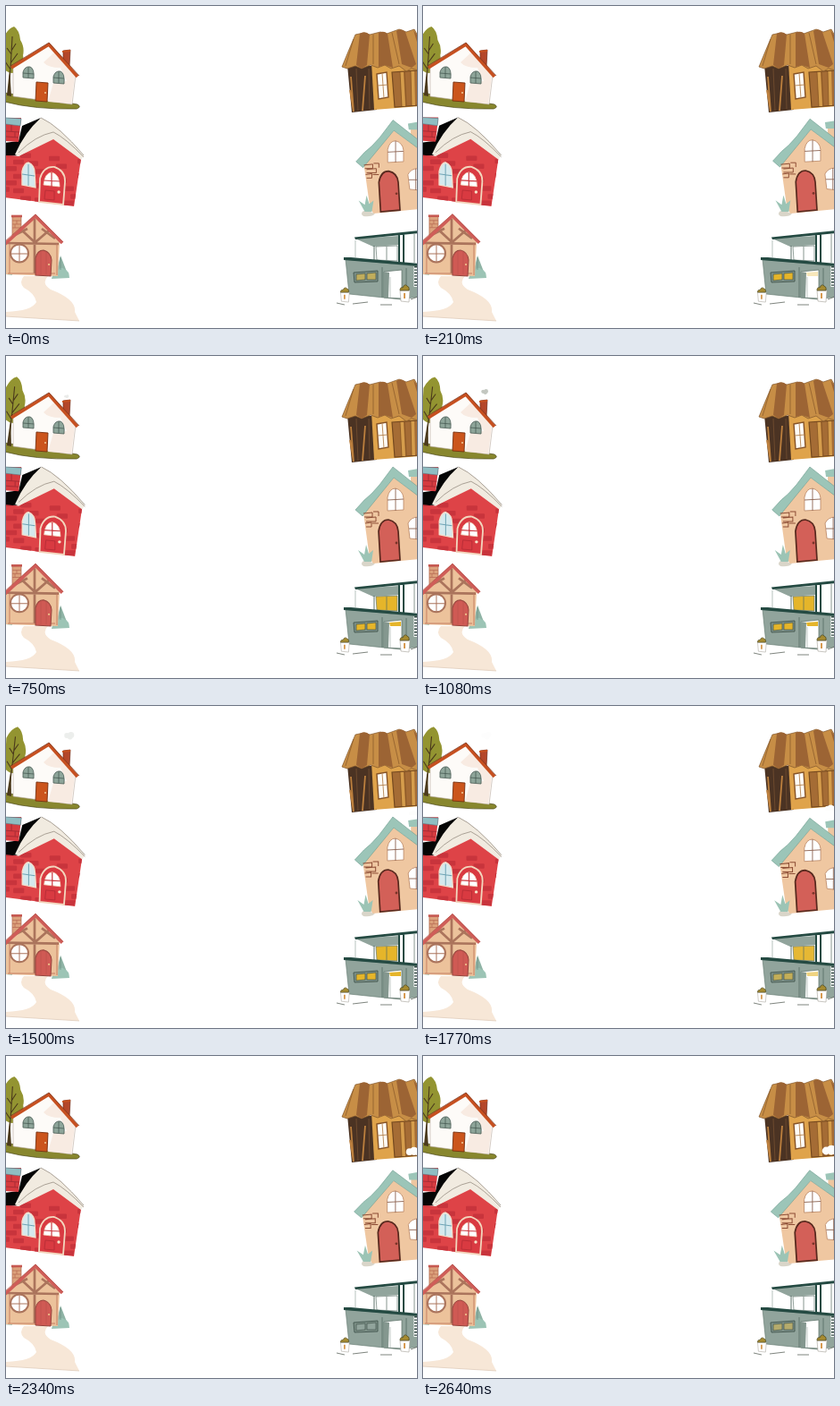
An HTML page for the animation above (2700 ms loop, 460x360 px).

```html
<!DOCTYPE html>
<html lang="en">
<head>
<meta charset="utf-8">
<title>Little houses</title>
<style>
html, body { margin: 0; width: 100%; height: 100%; overflow: hidden; background: #fff; }
svg { display: block; width: 460px; height: 360px; }
.line { fill: none; }
</style>
</head>
<body>
<svg viewBox="0 0 460 360">
  <!-- white cottage -->
  <path fill="#88872e" stroke="#4d4a1c" stroke-width=".7" d="M-2 97Q40 103 80 110Q85 113 79 115Q32 116 -2 107Z"/>
  <g id="tree">
    <path fill="#939431" d="M9 23Q15 27 16 38Q21 46 19 55Q21 65 12 73Q5 78-3 70V36Q2 25 9 23Z"/>
    <path class="line" stroke="#4b3a1c" stroke-width="1.1" d="M3 99Q5 72 7 34M5 64L13 53M5 71L-1 62M6 54L1 47M6 50L11 42"/>
    <path fill="#4b3a1c" d="M1 100L4 70L6 101Z"/>
  </g>
  <path fill="#b4472a" stroke="#6e2a18" stroke-width=".7" d="M64 50L72 49L71 68L64 63Z"/>
  <path class="line" stroke="#c65020" stroke-width="2" d="M63 51L72 50"/>
  <path fill="#fdfbf8" stroke="#b9aaa0" stroke-width=".6" d="M48 44L78 77L74 110L8 101V66Z"/>
  <path fill="#f8ebe2" d="M54 52L77 78L73 109L47 107L53 86L68 84L61 69Q47 69 42 63Z"/>
  <path class="line" stroke="#c65020" stroke-width="3.6" d="M6 69L48 43L80 79"/>
  <path class="line" stroke="#71301a" stroke-width=".7" d="M5 67L48 41L82 78"/>
  <path fill="#8ea59a" stroke="#485b54" stroke-width=".8" d="M19 80V74Q21 67 27 68Q32 70 31 81ZM53 86V79Q55 72 61 73Q66 75 65 87ZM25 68V80M19 75L31 76M59 73V86M53 80L65 81"/>
  <path fill="#cb551c" stroke="#773010" stroke-width=".9" d="M34 85L47 86L46 107L33 106Z"/>
  <circle cx="44" cy="97" r=".9" fill="#f5d9a8"/>
  <g id="smoke" fill="#c3c7c0"><circle r="2.6" cx="-2"/><circle r="3" cx="2" cy="-.4"/><circle r="2.4" cx="1" cy="1.6"/></g>

  <!-- snowy brick house -->
  <clipPath id="front"><path d="M53 147L84 170L76 224L-1 214V167L14 168Z"/></clipPath>
  <g id="red">
    <path fill="#050505" d="M39 125L18 134L14 151L-1 153V168L14 167Z"/>
    <path fill="#d63b40" d="M-1 125H17L14 152L-1 151Z"/>
    <path fill="#8fbdc2" stroke="#587f88" stroke-width=".6" d="M-1 125L17 126L16 134L-1 132Z"/>
    <path class="line" stroke="#a92d35" d="M-1 140L15 141M-1 146L14 147M6 133V140M10 141V147"/>
    <path fill="#de4347" d="M53 147L84 170L76 224L-1 214V167L14 168Z"/>
    <g id="bricks" fill="#c8343c" clip-path="url(#front)"></g>
    <path fill="#f1ebe0" d="M39 125Q58 133 87 167L84 172L53 149L14 168L10 166Q21 141 39 125Z"/>
    <path class="line" stroke="#8b8176" stroke-width=".7" d="M14 164Q33 145 53 141Q67 148 87 169M39 125Q59 134 87 167"/>
    <path fill="#d5e9ee" stroke="#f2dfcd" stroke-width="1.4" d="M18 200V185Q20 176 25 175Q32 178 32 187L33 203Z"/>
    <path class="line" stroke="#6fa4b5" stroke-width="1" d="M25 177V201M18 188L32 190"/>
    <path fill="#d93a41" stroke="#f3d6bd" stroke-width="1.8" d="M37 219L38 193Q42 179 54 180Q66 184 66 196L64 222Z"/>
    <path fill="#fff" stroke="#f3d6bd" stroke-width=".8" d="M42 200Q43 187 51 186Q60 188 60 202Z"/>
    <path class="line" stroke="#cb3a40" stroke-width="1.2" d="M51 186V202M42 195L60 196"/>
    <path class="line" stroke="#b72e36" stroke-width=".9" d="M44 206L54 207V217L43 216Z"/>
    <circle cx="59" cy="208" r="1.7" fill="#f6e3c9"/>
  </g>

  <!-- timber house with a path -->
  <path fill="#f7e7d7" d="M20 302H47Q39 310 50 317Q79 328 77 342L82 352L-1 347V342Q29 341 34 331Q32 321 20 315Q14 309 20 302Z"/>
  <path class="line" stroke="#dcc6b3" stroke-width=".7" d="M-1 347L82 352"/>
  <g id="timber">
    <path fill="#8fb3a5" d="M55 303L61 279L68 297L66 304Z"/>
    <path fill="#9cc4b5" d="M51 305Q53 295 58 296Q61 291 65 294Q71 296 71 304ZM-1 300V281Q5 287 7 301Z"/>
    <path class="line" stroke="#668f82" stroke-width=".7" d="M61 281V295"/>
    <path fill="#dca27c" stroke="#b16850" stroke-width=".7" d="M7 236L17 235V256L7 258Z"/>
    <path class="line" stroke="#b96d55" stroke-width=".8" d="M7 240H17M7 244H17M7 248H17M12 240V244M10 244V248"/>
    <path class="line" stroke="#c65952" stroke-width="2.6" d="M6 235H18"/>
    <path fill="#ecc29b" d="M33 236L60 264L58 302L-1 300V263Z"/>
    <path class="line" stroke="#ab745c" stroke-width="2.7" d="M-1 265L59 266M32 238V299M32 264L18 251M33 264L48 251M8 257L24 249M40 249L55 260"/>
    <path class="line" stroke="#c57e63" stroke-width="1" d="M4 266V299M57 266V301M2 299H55"/>
    <path class="line" stroke="#cf5d58" stroke-width="3.6" d="M-2 267L33 235L63 265"/>
    <path class="line" stroke="#a7433f" stroke-width=".6" d="M0 262L33 233L64 264"/>
    <circle cx="15" cy="276.5" r="10" fill="#fff" stroke="#ab745c" stroke-width="2"/>
    <path class="line" stroke="#ab745c" stroke-width="1" d="M15 267V287M5 277H25"/>
    <path fill="#cf5a54" stroke="#95443d" d="M33 301V282Q35 273 42 273Q50 275 51 284L50 302Z"/>
    <path class="line" stroke="#bd504a" stroke-width=".6" d="M39 274V300M45 274V300"/>
    <circle cx="48" cy="289" r="1" fill="#f0cd91"/>
  </g>

  <!-- thatched hut -->
  <path fill="#4b3323" d="M382 66L412 67L415 116L387 119Z"/>
  <path class="line" stroke="#6d4a2e" d="M392 70L394 117M406 70L407 115"/>
  <path class="line" stroke="#bd803e" stroke-width="1.8" d="M386 79L389 118M402 78L399 117M385 94L389 118"/>
  <path fill="#dfa34b" d="M409 62H462V112L412 116Z"/>
  <path fill="#fffdf7" stroke="#855226" stroke-width="1.4" d="M415 76L426 74L428 102L417 104Z"/>
  <path class="line" stroke="#b48350" stroke-width=".9" d="M421 75L423 103M416 89L427 88"/>
  <path fill="#a56c35" stroke="#75491f" stroke-width="1.2" d="M432 74L462 72V111L435 113Z"/>
  <path class="line" stroke="#d59d4c" stroke-width="4" d="M443 74L445 112M455 73L456 111"/>
  <path class="line" stroke="#80501f" stroke-width=".7" d="M441 74L443 112M446 73L448 111M453 73L454 111"/>
  <path fill="#c78e46" stroke="#80552b" stroke-width=".7" d="M391 32L400 30L407 32L419 29L426 31L440 26L448 29L457 26L462 35V72L454 70L448 73L440 67L431 70L424 66L416 69L408 66L398 70L391 67L382 70L376 68L383 51Z"/>
  <path fill="#9c6434" d="M396 31Q402 27 407 32L404 66L398 70L392 66ZM417 30Q423 27 427 31L433 69L424 66L417 68ZM437 28Q443 24 447 29L459 65L454 69L443 65ZM456 27L462 35V47Z"/>
  <path class="line" stroke="#865629" stroke-width=".7" d="M389 37L380 67M411 32L411 65M432 30L440 65"/>

  <!-- peach house -->
  <g id="steam" fill="#fdfdfc"><circle r="4.5" cx="-4" cy="1"/><circle r="5.5" cx="2"/><circle r="4.5" cx="7" cy="1"/></g>
  <path fill="#d9d5c9" d="M398 233Q398 228 405 229L413 232Q410 236 400 235Z"/>
  <g id="peach">
    <path fill="#eec6a0" d="M453 132H462V160H453Z"/>
    <path fill="#9cc5b8" d="M450 128L462 126V135H451Z"/>
    <path fill="#efc7a1" d="M434 136L462 157V227L411 232L407 226L400 176Z"/>
    <path fill="#9cc5b8" stroke="#6c9b8d" stroke-width=".6" d="M433 124L462 147V157L434 136L399 179L391 172L401 161L409 154L418 144Z"/>
    <path fill="#fff" stroke="#c08e6d" stroke-width=".9" d="M427 173V158Q429 148 436 148Q444 150 445 159V172Z"/>
    <path class="line" stroke="#8c6250" stroke-width=".9" d="M436 148V173M427 161L445 160"/>
    <path fill="#fff" stroke="#c08e6d" stroke-width=".9" d="M452 204L450 187Q453 180 462 180V205Z"/>
    <path class="line" stroke="#8c6250" stroke-width=".9" d="M451 193H462M459 180V205"/>
    <path class="line" stroke="#8d4d35" stroke-width="1" d="M400 176L410 175V180H401M411 174H417V179M403 181L414 180V185H403M402 187L409 186V191H403M410 187H417"/>
    <path fill="#d36058" stroke="#58291e" stroke-width="1.7" d="M419 230L417 196Q419 183 428 183Q438 185 439 196L441 228Z"/>
    <circle cx="437" cy="209" r="1.4" fill="#7b3429"/>
    <path fill="#9cc4b5" d="M401 230L394 217L401 222L403 211L406 221L411 217L409 230Z"/>
  </g>

  <!-- modern house -->
  <path class="line" stroke="#9aaaa3" stroke-width=".7" d="M391 262V281"/>
  <path fill="#91a49c" d="M391 260L411 269L440 267V257Z"/>
  <path class="line" stroke="#4c635a" stroke-width=".9" d="M412 268V284"/>
  <path id="upper" stroke="#657970" stroke-width=".7" d="M414 269L438 268V285L415 284Z"/>
  <path class="line" stroke="#536760" stroke-width=".7" d="M426 269V284M457 255V287"/>
  <path fill="#244a42" d="M390 258.5L462 251V254L391 261ZM439 256H441V287H439ZM444 255H446V287H444Z"/>
  <path fill="#91a49c" stroke="#5d756b" stroke-width=".6" d="M380 283L462 291V325L442 328L384 322Z"/>
  <path fill="#244a42" d="M378 281L386 281L462 288V291L378 284Z"/>
  <path class="line" stroke="#61766e" d="M421 292V326M448 293V314"/>
  <path fill="#7d9188" stroke="#42554e" stroke-width=".9" d="M389 298L416 296V308L390 309Z"/>
  <path id="lower" stroke="#42554e" stroke-width=".7" d="M392 300L402 299V306L392 307ZM404 299L414 298V306H404Z"/>
  <path fill="#fff" stroke="#62776e" stroke-width=".8" d="M423 297L443 295V327L423 326Z"/>
  <path fill="#84978f" d="M423 297L429 298L428 326H423Z"/>
  <path id="lamp" d="M429 298L442 297V302H430Z"/>
  <path class="line" stroke="#a6b4ae" stroke-width=".7" d="M430 303V326"/>
  <path class="line" stroke="#fff" stroke-width="5" d="M459 291V314"/>
  <path class="line" stroke="#2e453f" stroke-width="4" stroke-dasharray="1.4 2" d="M459 291V314"/>
  <path class="line" stroke="#5f665f" stroke-width=".8" d="M370 332L379 334M388 333L405 331M419 334H432M453 328L461 325"/>
  <g id="pot">
    <path fill="#fff" stroke="#a3a098" stroke-width=".6" d="M441 318H452L451 331L442 330Z"/>
    <path fill="#a68b31" stroke="#514d24" stroke-width=".8" d="M441 318Q441 314 444 315Q446 310 449 313Q452 314 451 318Z"/>
    <path fill="#d79a51" d="M445 321H447V327H445Z"/>
  </g>
  <use href="#pot" transform="translate(-18 53) scale(.89 .84)"/>
</svg>
<script>
const LOOP = 2700;
const $ = id => document.getElementById(id);
const ramp = (t, from, to) => Math.max(0, Math.min(1, (t - from) / (to - from)));
const ease = v => v * v * (3 - 2 * v);
const wave = (t, peak) => .5 + .5 * Math.cos((t - peak) / LOOP * 2 * Math.PI);

for (let row = 0; row < 7; row++) {
  for (let col = 0; col < 6; col++) {
    if ((row * 3 + col * 2) % 5 > 2) continue;
    const brick = document.createElementNS('http://www.w3.org/2000/svg', 'rect');
    const x = col * 16 - (row % 2) * 8;
    const attrs = { x, y: 163 + row * 8 + x * .1, width: 12, height: 5.5, rx: 1 };
    for (const key in attrs) brick.setAttribute(key, attrs[key]);
    $('bricks').append(brick);
  }
}

// Scale around a fixed point on the ground.
function stretch(id, x, y, sx, sy) {
  $(id).setAttribute('transform', `translate(${x} ${y}) scale(${sx} ${sy}) translate(${-x} ${-y})`);
}

function light(id, level, off) {
  const on = [229, 181, 42];
  $(id).setAttribute('fill', `rgb(${off.map((c, i) => c + (on[i] - c) * level)})`);
}

function place(id, x, y, scale, opacity) {
  $(id).setAttribute('transform', `translate(${x} ${y}) scale(${scale})`);
  $(id).setAttribute('opacity', opacity);
}

function draw(now) {
  const t = now % LOOP;
  const breath = ease(ramp(t, -100, 600)) * (1 - ease(ramp(t, 1500, 2200)));
  stretch('red', 0, 222, 1 + breath * .015, 1 + breath * .01);
  stretch('timber', 30, 302, 1, 1 + breath * .01);
  stretch('peach', 440, 232, .985 + t / LOOP * .05, .965 + breath * .035);
  $('tree').setAttribute('transform', `rotate(${wave(t, 1250) * 3.3} 4 100)`);

  const rise = ramp(t, 700, 1500);
  const thin = (1 - .7 * ramp(t, 1080, 1500)) * (1 - ramp(t, 1500, 1800));
  place('smoke', 67.5 + rise * 3, 46 - rise * 13, .5 + rise * .65, ramp(t, 700, 850) * thin);
  const drift = ramp(t, 1300, 2700);
  place('steam', 455, 125 - 20 * drift * (2 - drift), .4 + .6 * drift, ramp(t, 1300, 1500));

  const glow = 1 - ramp(t, 1650, 1950);
  const dusk = ramp((t + 300) % LOOP, 50, 500);
  light('lower', dusk * glow + (t > 2400 ? dusk : 0), [145, 164, 156]);
  light('lamp', ramp(t, 120, 400) * glow, [255, 255, 255]);
  light('upper', ramp(t, 450, 720) * (1 - ramp(t, 1750, 2200)), [255, 255, 255]);
  requestAnimationFrame(draw);
}
requestAnimationFrame(draw);
</script>
</body>
</html>
```
